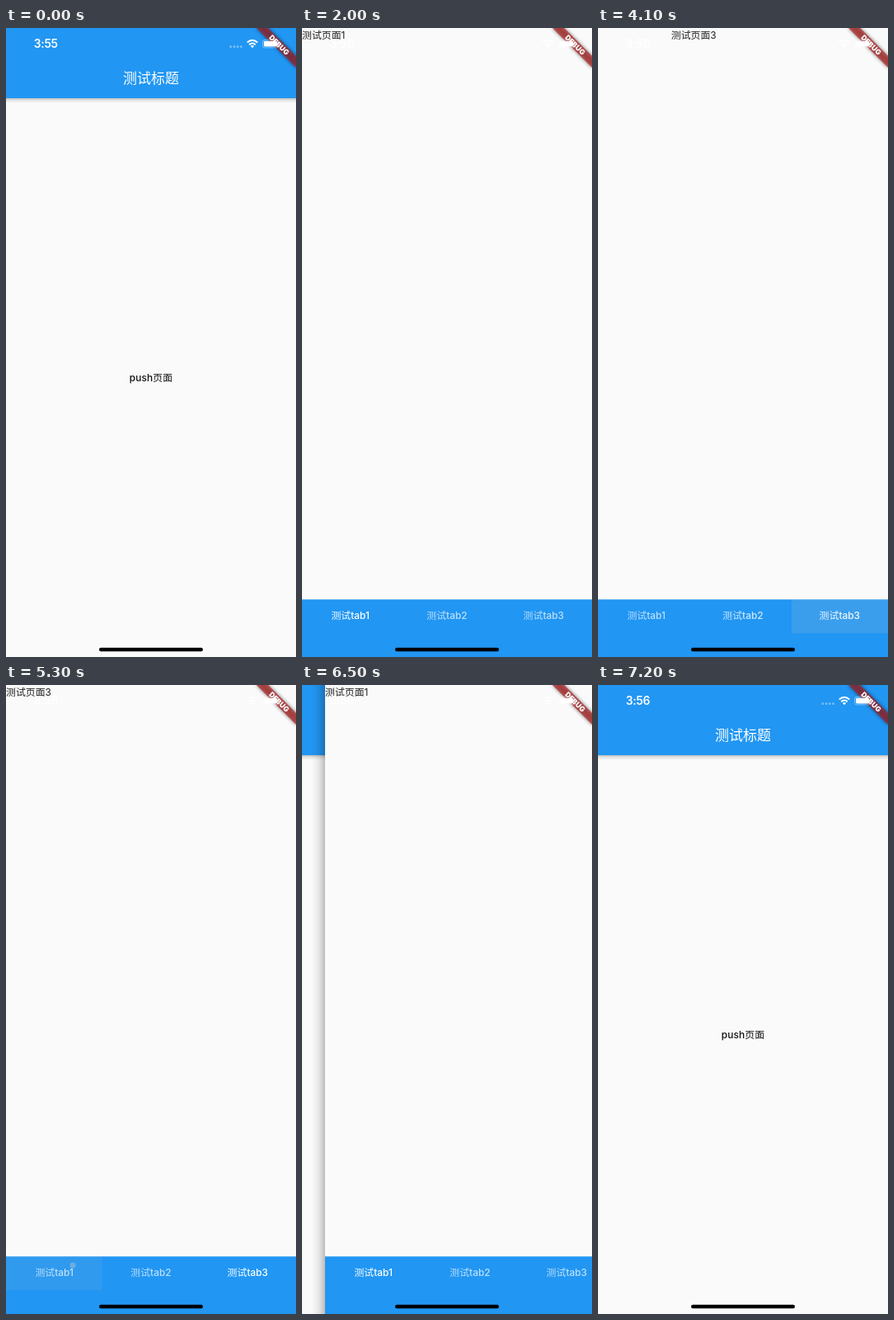
Recreate the animation shown at these times as an HTML page. Size 352 px wide and 762 px high, loop 7.3 s.

```html
<!DOCTYPE html>
<html lang="zh-CN">
<head>
<meta charset="utf-8">
<style>
  html, body { margin: 0; width: 100%; height: 100%; overflow: hidden; background: #fafafa; }
  svg { display: block; }
  text { font-family: Inter, "Noto Sans CJK SC", "Noto Sans CJK", "Noto Sans CJK JP", sans-serif; font-size: 11.9px; }
  .mid { text-anchor: middle; }
  .medium { font-weight: 500; }
</style>
</head>
<body>
<svg id="stage" width="100%" height="100%" viewBox="0 0 352 762">
  <defs>
    <linearGradient id="barShadow" x2="0" y2="1">
      <stop stop-color="#000" stop-opacity=".24"/>
      <stop offset=".4" stop-color="#000" stop-opacity=".1"/>
      <stop offset="1" stop-color="#000" stop-opacity="0"/>
    </linearGradient>
    <linearGradient id="edgeShadow">
      <stop stop-color="#000" stop-opacity="0"/>
      <stop offset=".3" stop-color="#000" stop-opacity=".03"/>
      <stop offset=".6" stop-color="#000" stop-opacity=".09"/>
      <stop offset="1" stop-color="#000" stop-opacity=".25"/>
    </linearGradient>
    <filter id="blur" x="-20%" y="-100%" width="140%" height="300%">
      <feGaussianBlur stdDeviation="2.8"/>
    </filter>
  </defs>

  <g id="home">
    <rect width="352" height="762" fill="#fafafa"/>
    <rect y="85" width="352" height="6" fill="url(#barShadow)"/>
    <rect width="352" height="85" fill="#2196f3"/>
    <text class="mid" x="176" y="67.4" fill="#fff" style="font-size:17px;font-weight:500">测试标题</text>
    <rect id="button" x="136.4" y="408.5" width="78" height="30" rx="1.7" fill="#f6f6f6"/>
    <text class="mid medium" x="176" y="428" fill="#111" letter-spacing=".1">push页面</text>
  </g>

  <g id="tabsPage">
    <rect x="-17.6" width="17.6" height="762" fill="url(#edgeShadow)"/>
    <rect width="352" height="762" fill="#fafafa"/>
    <g id="views"></g>
    <rect y="692.3" width="352" height="69.7" fill="#2196f3"/>
    <g id="tabs"></g>
  </g>

  <g transform="translate(352 0) rotate(45) scale(.85)">
    <rect x="-40" y="28" width="80" height="12" fill="#000" fill-opacity=".5" filter="url(#blur)"/>
    <rect x="-40" y="28" width="80" height="12" fill="#b71c1c" fill-opacity=".63"/>
    <text class="mid" y="37.7" fill="#fff" style="font-size:10.2px;font-weight:900">DEBUG</text>
  </g>

  <g fill="#fff">
    <text id="clock" class="mid" x="48.3" y="24" style="font-size:13.8px;font-weight:600" letter-spacing="-.3"></text>
    <g opacity=".4">
      <circle cx="272.8" cy="22.7" r="1.4"/><circle cx="277" cy="22.7" r="1.4"/>
      <circle cx="281.2" cy="22.7" r="1.4"/><circle cx="285.4" cy="22.7" r="1.4"/>
    </g>
    <g fill="none" stroke="#fff" stroke-width="2">
      <path d="M292.8 17.6Q299 11.8 305.2 17.6"/>
      <path d="M295.2 20.2Q299 16.8 302.8 20.2"/>
    </g>
    <path d="M296.8 21.8Q299 20 301.2 21.8L299 24.2Z"/>
    <rect x="311.5" y="14.3" width="19.4" height="9.6" rx="2.6" fill="none" stroke="#fff" stroke-opacity=".4"/>
    <rect x="313" y="15.8" width="16.4" height="6.6" rx="1.4"/>
    <path d="M332 17.5q1.6 1.6 0 3.2z" opacity=".4"/>
  </g>
  <rect x="113" y="750.8" width="126" height="4.4" rx="2.2" fill="#000"/>
</svg>

<script>
const LOOP = 7300, STEP = 100, W = 352, TAB = W / 3;
const $ = id => document.getElementById(id);
const clamp = v => Math.min(1, Math.max(0, v));

function bezier(x1, y1, x2, y2) {
  const at = (a, b, s) => 3 * a * s * (1 - s) ** 2 + 3 * b * s * s * (1 - s) + s ** 3;
  return x => {
    if (x <= 0 || x >= 1) return clamp(x);
    let lo = 0, hi = 1;
    for (let i = 0; i < 24; i++) {
      const m = (lo + hi) / 2;
      if (at(x1, x2, m) < x) lo = m; else hi = m;
    }
    return at(y1, y2, lo);
  };
}
const ease = bezier(.25, .1, .25, 1);
const pushEase = bezier(.35, .91, .33, .97);

const taps = [
  { from: 0, to: 1, down: 3160, up: 3290, x: 60, y: 18 },
  { from: 1, to: 2, down: 3750, up: 3965, x: 60, y: 18 },
  { from: 2, to: 0, down: 5255, up: 5348, x: 81, y: 10.7 }
];

const ids = [0, 1, 2];
$('views').innerHTML = ids.map(i => `<text y="13" fill="#212121">测试页面${i + 1}</text>`).join('');
$('tabs').innerHTML = ids.map(i => `
  <svg x="${i * TAB}" y="692.3" width="${TAB}" height="41">
    <rect width="${TAB}" height="41" fill="#bcbcbc"/>
    <circle fill="#c8c8c8"/>
    <text class="mid medium" x="${TAB / 2}" y="24" fill="#fff">测试tab${i + 1}</text>
  </svg>`).join('');
const views = [...$('views').children];
const tabs = [...$('tabs').children].map(el => {
  const [glow, splash, label] = el.children;
  return { glow, splash, label };
});

function drawInk(tap, t) {
  const { glow, splash } = tabs[tap.to];
  const fade = t < tap.down ? 0 : 1 - clamp((t - tap.up) / 170);
  const held = clamp((Math.min(t, tap.up) - tap.down) / 200);
  glow.setAttribute('opacity', .4 * held * fade);
  splash.setAttribute('opacity', .4 * fade);
  splash.setAttribute('cx', tap.x);
  splash.setAttribute('cy', tap.y);
  splash.setAttribute('r', Math.max(0, t - tap.down) * .08 + Math.max(0, t - tap.up));
}

function drawTabs(t) {
  const pos = [0, W, W], weight = [1, 0, 0];
  for (const { from, to, up } of taps) {
    if (t < up) break;
    const p = ease((t - up) / 300), dir = Math.sign(to - from);
    pos.fill(W);
    weight.fill(0);
    pos[from] = -dir * p * W;
    pos[to] = dir * (1 - p) * W;
    weight[from] = 1 - p;
    weight[to] = p;
  }
  ids.forEach(i => {
    views[i].setAttribute('x', pos[i]);
    tabs[i].label.setAttribute('fill-opacity', .7 + .3 * weight[i]);
  });
  taps.forEach(tap => drawInk(tap, t));
}

// Left edge of the tabs page: pushed in, later dragged back out.
function pageX(t) {
  if (t < 6250) return W * (1 - pushEase((t - 1580) / 400));
  return Math.min(W, 28 * ((t - 6250) / 250) ** 1.95);
}

function draw(t) {
  const x = pageX(t);
  $('tabsPage').setAttribute('transform', `translate(${x})`);
  $('tabsPage').setAttribute('visibility', x < W ? 'visible' : 'hidden');
  $('home').setAttribute('transform', `translate(${(x - W) / 3})`);
  $('button').setAttribute('opacity', t >= 1400 && t < 1800 ? 1 : 0);
  $('clock').textContent = t < 100 ? '3:55' : '3:56';
  drawTabs(t);
}

const start = performance.now();
function tick() {
  const t = (performance.now() - start) % LOOP;
  draw(Math.floor(t / STEP) * STEP);
  requestAnimationFrame(tick);
}
tick();
</script>
</body>
</html>
```
